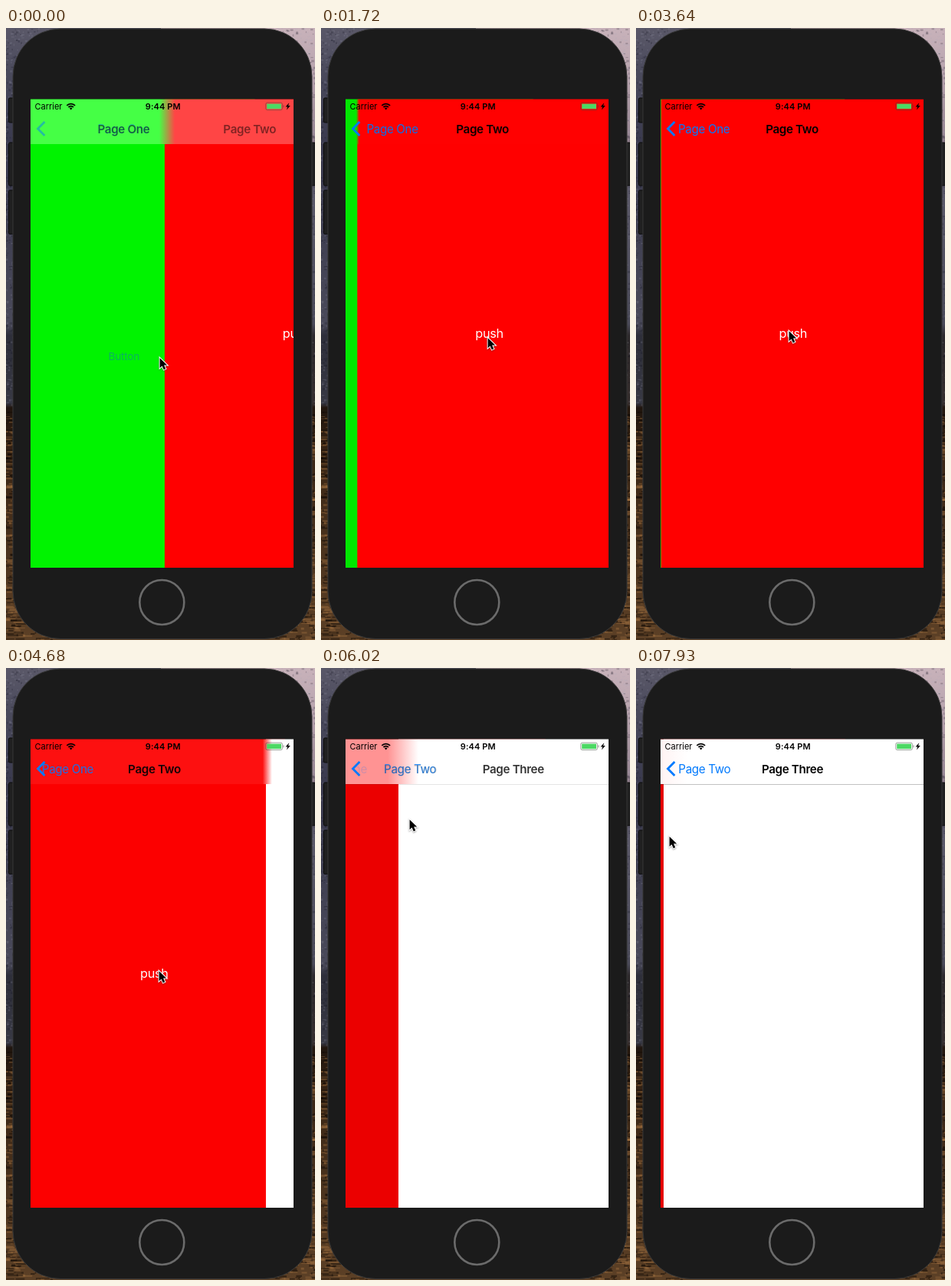
An HTML page with a canvas for the animation above (8000 ms loop, 403 by 796 pixels).

```html
<!DOCTYPE html>
<html lang="en">
<head>
<meta charset="utf-8">
<title>Navigation push</title>
<style>
html, body { margin: 0; width: 100%; height: 100%; overflow: hidden; background: #1b1b1b; }
canvas { display: block; width: 403px; height: 796px; }
</style>
</head>
<body>
<canvas id="stage" width="403" height="796"></canvas>
<script>
const W = 403, H = 796, LOOP = 8000;
const SCREEN = { x: 32, y: 92.5, w: 343, h: 609.5 };
const BAR_H = 58.5, MID = 203.5, BACK_X = 55, TITLE_Y = 136.5;
const BLUE = '#007aff';
const TITLE = '600 15.2px Inter, "Open Sans", sans-serif';
const PLAIN = '400 15.2px Inter, "Open Sans", sans-serif';
const ctx = document.getElementById('stage').getContext('2d');

// Time, x, y
const POINTER = [
  [0, 200, 428], [1300, 200, 428], [1720, 217, 402], [2400, 199, 393],
  [5300, 199, 393], [6020, 115, 196], [7000, 43, 218], [8000, 43, 218]
];

const clamp = v => Math.min(1, Math.max(0, v));
const mix = (a, b, k) => a.map((v, i) => v + (b[i] - v) * k);
const rgb = c => `rgb(${c.map(Math.round).join(',')})`;
const spring = u => u <= 0 ? 1 : (1 + u) * Math.exp(-u);

function fillRect(c, color, x, y, w, h) {
  c.fillStyle = color;
  c.fillRect(x, y, w, h);
}

function text(str, x, y, font, color, { alpha = 1, align = 'left', spacing = -0.35 } = {}) {
  ctx.save();
  ctx.globalAlpha *= clamp(alpha);
  ctx.font = font;
  ctx.letterSpacing = spacing + 'px';
  ctx.textAlign = align;
  ctx.fillStyle = color;
  ctx.fillText(str, x, y);
  ctx.restore();
}

function vertical(c, stops) {
  const g = c.createLinearGradient(0, 0, 0, H);
  stops.forEach(([at, color]) => g.addColorStop(at / H, color));
  return g;
}

function makeBackdrop() {
  const canvas = document.createElement('canvas');
  canvas.width = W;
  canvas.height = H;
  const c = canvas.getContext('2d');

  fillRect(c, vertical(c, [[0, '#5a5868'], [60, '#4a4a5c'], [150, '#3a3a4e'], [270, '#404052'], [385, '#4a4a5a'],
    [400, '#2e2f3a'], [488, '#383944'], [494, '#20150d'], [560, '#3a2615'], [H, '#5c4026']]), 0, 0, 202, H);
  fillRect(c, vertical(c, [[0, '#c8b2ba'], [60, '#b8a4ae'], [150, '#93828f'], [210, '#5c5a6a'], [385, '#4a4a58'],
    [400, '#2e2a2c'], [488, '#352d2c'], [494, '#24170d'], [560, '#3a2615'], [H, '#5c4026']]), 202, 0, 201, H);

  let seed = 7;
  const random = () => (seed = seed * 16807 % 2147483647) / 2147483647;
  const speckle = (top, bottom, dark, light, count, length) => {
    for (let i = 0; i < count; i++) {
      const x = random() < 0.5 ? random() * 60 - 6 : W - random() * 60;
      const y = top + random() * (bottom - top);
      fillRect(c, random() < 0.5 ? dark : light, x, y, 1 + random() * length, 1 + random() * 2);
    }
  };
  speckle(0, 490, 'rgba(15,15,28,.22)', 'rgba(170,165,185,.16)', 2600, 3);
  speckle(496, H, 'rgba(14,8,4,.5)', 'rgba(165,115,65,.4)', 1500, 14);

  const box = (x, y, w, h, r, fill, stroke) => {
    c.beginPath();
    c.roundRect(x, y, w, h, r);
    c.fillStyle = fill;
    c.fill();
    c.strokeStyle = stroke;
    c.lineWidth = 1;
    c.stroke();
  };
  [[3.5, 91, 32], [3.5, 149, 56], [3.5, 211, 57], [396, 149, 56]]
    .forEach(([x, y, h]) => box(x, y, 8, h, 1.5, '#202020', '#0b0b0b'));
  box(9, 1, 390, 793.5, 62, '#1b1b1b', '#383838');

  c.beginPath();
  c.arc(203.3, 747, 29, 0, 7);
  c.strokeStyle = '#6b6b6b';
  c.lineWidth = 2.6;
  c.stroke();
  return canvas;
}

function drawStatus() {
  text('Carrier', 37.5, 106, '400 11px Inter, "Open Sans", sans-serif', '#000', { spacing: 0 });
  text('9:44 PM', 204.7, 106, '600 11px Inter, "Open Sans", sans-serif', '#000', { align: 'center', spacing: 0.1 });

  ctx.strokeStyle = ctx.fillStyle = '#000';
  ctx.lineWidth = 1.9;
  for (const r of [7.6, 4.5]) {
    ctx.beginPath();
    ctx.arc(84.7, 106.2, r, -Math.PI * 0.75, -Math.PI * 0.25);
    ctx.stroke();
  }
  ctx.beginPath();
  ctx.moveTo(84.7, 106.6);
  ctx.arc(84.7, 106.2, 2.5, -Math.PI * 0.75, -Math.PI * 0.25);
  ctx.fill();

  ctx.lineWidth = 1;
  ctx.strokeStyle = 'rgba(60,70,60,.5)';
  ctx.beginPath();
  ctx.roundRect(338.8, 97.2, 21.6, 9.4, 2);
  ctx.stroke();
  fillRect(ctx, '#4cd964', 340.2, 98.6, 18.8, 6.6);
  fillRect(ctx, 'rgba(60,70,60,.5)', 361.4, 100.4, 1.2, 3);
  ctx.fillStyle = '#000';
  ctx.fill(new Path2D('M369.3 97.2 L364.6 102.4 H367.2 L366 106.4 L370.8 101 H368.1 Z'));
}

function drawChevron(alpha) {
  ctx.save();
  ctx.globalAlpha = alpha;
  ctx.strokeStyle = BLUE;
  ctx.lineWidth = 2.8;
  ctx.stroke(new Path2D('M50.4 122 L41.5 131 L50.4 140'));
  ctx.restore();
}

function drawPage(page, x, shade) {
  fillRect(ctx, rgb(page.color), x, SCREEN.y, SCREEN.w, SCREEN.h);
  if (page.label) {
    text(page.label, x + SCREEN.w / 2 + 0.7, page.labelY, page.font, page.ink, { align: 'center', spacing: -0.3 });
  }
  if (shade) fillRect(ctx, `rgba(0,0,0,${shade})`, x, SCREEN.y, SCREEN.w, SCREEN.h);
}

const one = {
  title: 'Page One', color: [0, 255, 0], label: 'Button', labelY: 431.5,
  font: '400 13.7px Inter, "Open Sans", sans-serif', ink: '#0abc64'
};
const two = {
  title: 'Page Two', color: [255, 0, 0], label: 'push', labelY: 403,
  font: '400 16.3px Inter, "Open Sans", sans-serif', ink: '#fff'
};
const three = { title: 'Page Three', color: [255, 255, 255] };

const PUSHES = [
  {
    from: one, to: two, start: -875, rate: 1.88, travel: 224,
    frost: left => left ** 1.95, blur: left => 1 + 18 * left, chevron: left => 1 - left
  },
  {
    from: two, to: three, start: 4380, rate: 1.82, travel: 235, oldBack: 'Page One',
    frost: left => 0.6 * (1 - left) + 0.37 * (1 - left) ** 6,
    blur: left => 24 - 20 * left, chevron: () => 1
  }
];

function drawBar(push, left, edge) {
  const { from, to } = push;
  const done = 1 - left, frost = push.frost(left), blur = push.blur(left);
  const white = [255, 255, 255];
  const under = mix(from.color.map(v => v * (1 - 0.1 * done)), from.color, clamp(frost * 4));
  const g = ctx.createLinearGradient(edge - 0.7 * blur, 0, edge + 1.3 * blur, 0);
  g.addColorStop(0, rgb(mix(under, white, frost)));
  g.addColorStop(1, rgb(mix(to.color, white, frost)));
  if (left > 0.003) fillRect(ctx, g, SCREEN.x, SCREEN.y, SCREEN.w, BAR_H);
  if (to === three) fillRect(ctx, `rgba(0,0,0,${0.25 * done ** 4})`, SCREEN.x, 151, SCREEN.w, 1);

  if (push.oldBack) {
    ctx.save();
    ctx.beginPath();
    ctx.rect(46, SCREEN.y, 330, BAR_H);
    ctx.clip();
    text(push.oldBack, BACK_X - 78 * done, TITLE_Y, PLAIN, BLUE, { alpha: left });
    ctx.restore();
  }
  drawChevron(push.chevron(left));

  // Titles settle a little ahead of the pages; the outgoing one turns into the back label
  const slide = left * Math.min(1, left * 16);
  const backX = BACK_X + 140 * slide - 26.5 * slide * slide;
  text(from.title, backX, TITLE_Y, PLAIN, BLUE, { alpha: done });
  text(from.title, backX, TITLE_Y, TITLE, '#000', { alpha: left });
  text(to.title, MID + push.travel * slide, TITLE_Y, TITLE, '#000', { alpha: done, align: 'center' });
}

function drawPointer(ms) {
  const i = Math.max(1, POINTER.findIndex(p => p[0] > ms));
  const [t0, ...a] = POINTER[i - 1], [t1, ...b] = POINTER[i];
  const k = clamp((ms - t0) / (t1 - t0));
  const [x, y] = mix(a, b, k * k * (3 - 2 * k));
  const arrow = new Path2D('M0.6 1.2 V14.2 L3.6 11.4 L5.8 16.4 L8.3 15.3 L6.1 10.4 H10.2 Z');
  ctx.save();
  ctx.translate(x, y);
  ctx.shadowColor = 'rgba(0,0,0,.35)';
  ctx.shadowBlur = 2;
  ctx.shadowOffsetY = 1;
  ctx.strokeStyle = '#fff';
  ctx.lineWidth = 2;
  ctx.stroke(arrow);
  ctx.shadowColor = 'transparent';
  ctx.fillStyle = '#000';
  ctx.fill(arrow);
  ctx.restore();
}

const backdrop = makeBackdrop();

function draw(ms) {
  const push = PUSHES[ms < PUSHES[1].start ? 0 : 1];
  const left = spring((ms - push.start) / 1000 * push.rate);
  const edge = SCREEN.x + SCREEN.w * left;

  ctx.drawImage(backdrop, 0, 0);
  ctx.save();
  ctx.beginPath();
  ctx.rect(SCREEN.x, SCREEN.y, SCREEN.w, SCREEN.h);
  ctx.clip();
  drawPage(push.from, SCREEN.x - 0.3 * SCREEN.w * (1 - left), 0.1 * (1 - left));
  drawPage(push.to, edge, 0);
  drawBar(push, left, edge);
  drawStatus();
  ctx.restore();
  drawPointer(ms);
}

const begin = performance.now();
function tick() {
  draw((performance.now() - begin) % LOOP);
  requestAnimationFrame(tick);
}
tick();
</script>
</body>
</html>
```
